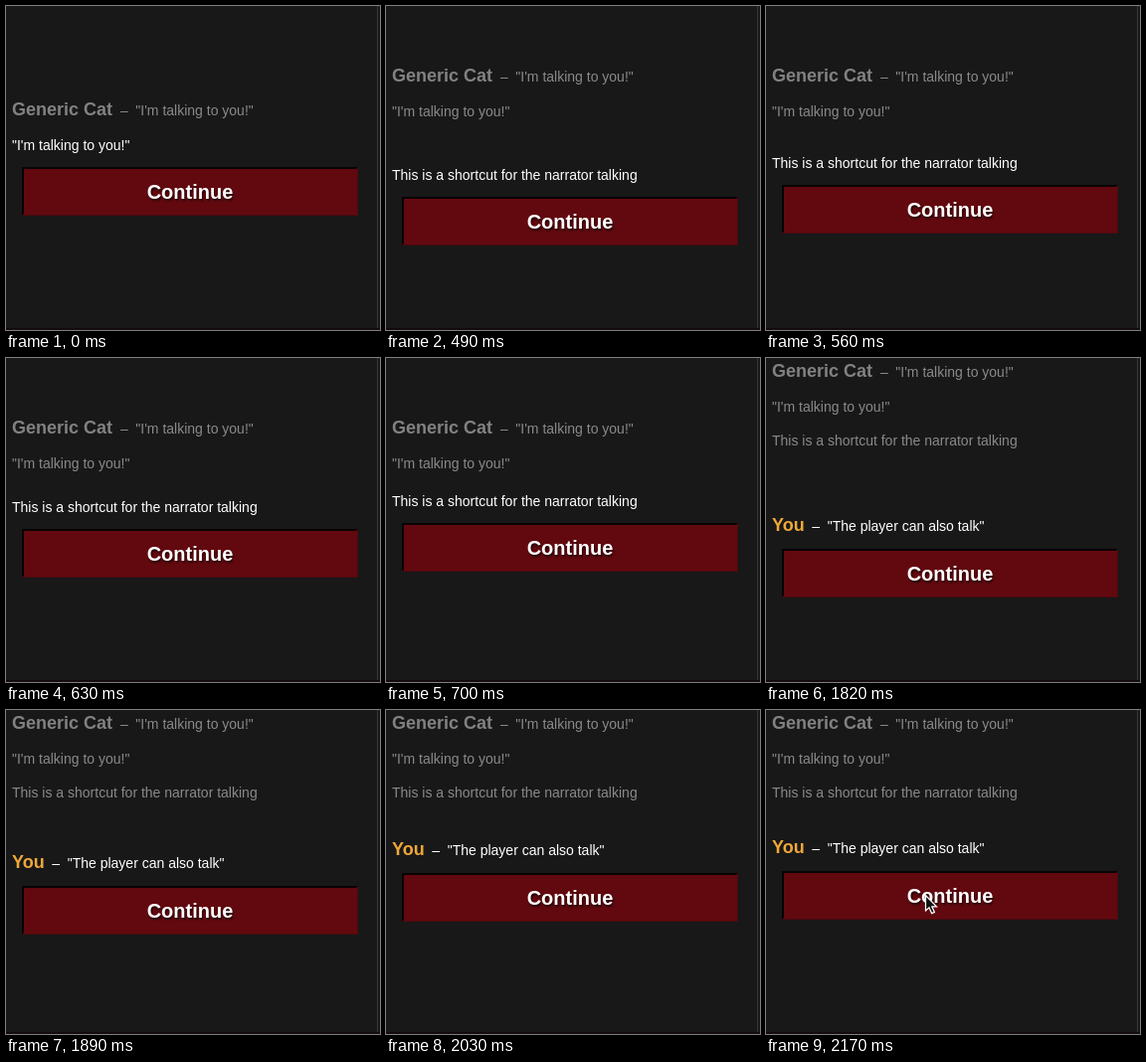
Recreate the animation shown at these times as an HTML page. Size 376 by 326 pixels, loop 2380 ms.

```html
<!DOCTYPE html>
<html lang="en">
<head>
<meta charset="utf-8">
<title>Dialogue</title>
<style>
  html, body { margin: 0; width: 100%; height: 100%; overflow: hidden; background: #181818; }
  svg { display: block; width: 376px; height: 326px; font: 14px "Liberation Sans", Arial, sans-serif; }
  .name { font-size: 18px; font-weight: bold; }
  .old { fill: #8a8a8a; }
  .old .name { fill: #828282; }
  .new { fill: #fff; }
  .new .name { fill: #efa83a; }
  .label { font-size: 20px; font-weight: bold; fill: #fff; text-anchor: middle; text-shadow: 1px 2px 2px #000a; }
</style>
</head>
<body>
<svg viewBox="0 0 376 326">
  <rect width="376" height="326" fill="#181818"/>
  <rect x="373" width="1" height="326" fill="#3a3634"/>
  <rect y="324" width="376" height="2" fill="#130b0e"/>
  <g id="cat">
    <text class="name" x="6">Generic Cat</text>
    <text x="115">–</text>
    <text x="130.3">"I'm talking to you!"</text>
  </g>
  <g id="quote"><text x="6">"I'm talking to you!"</text></g>
  <g id="narrator"><text x="6">This is a shortcut for the narrator talking</text></g>
  <g id="you">
    <text class="name" x="6">You</text>
    <text x="46.3">–</text>
    <text x="61.7">"The player can also talk"</text>
  </g>
  <g id="button">
    <rect x="16" y="162" width="338" height="49" fill="#62090f"/>
    <path d="M16 162H354L352 164H18V209L16 211Z" fill="#080304"/>
    <path d="M353.5 163V210.5H17" fill="none" stroke="#4b0a0f"/>
    <text class="label" x="185" y="194">Continue</text>
  </g>
  <path id="cursor" d="M160.5 186.5V202L164 198.8L166.6 204.6L169.4 203.4L166.8 197.8H171.5Z"
        fill="#111" stroke="#fff" stroke-width="1.2"/>
</svg>
<script>
  const LOOP = 2380, STEP = 70, SLIDE = 350, DROP = 30;
  const ids = ["cat", "quote", "narrator", "you"];
  const $ = id => document.getElementById(id);

  // Baselines of the lines visible in each scene; the last one is active.
  const scenes = [
    { start: 0, lines: [110, 145], ease: 0 },
    { start: 490, lines: [76, 111, 145], ease: 2.2 },
    { start: 1820, lines: [19, 54, 88, 144], ease: 3 }
  ];

  function slideOffset(scene, t) {
    if (!scene.ease) return 0;
    const elapsed = Math.floor((t - scene.start) / STEP) * STEP;
    const left = Math.max(0, 1 - elapsed / SLIDE);
    return Math.round(DROP * left ** scene.ease);
  }

  function move(el, y) {
    el.setAttribute("transform", `translate(0 ${y})`);
  }

  function draw(t) {
    const scene = scenes.filter(s => t >= s.start).pop();
    const offset = slideOffset(scene, t);
    const last = scene.lines.length - 1;
    ids.forEach((id, i) => {
      const el = $(id);
      el.style.display = i <= last ? "" : "none";
      if (i > last) return;
      el.setAttribute("class", i === last ? "new" : "old");
      move(el, scene.lines[i] + (i === last ? offset : 0));
    });
    move($("button"), offset);
    $("cursor").style.display = t >= 2170 ? "" : "none";
  }

  const began = performance.now();
  function tick() {
    draw((performance.now() - began) % LOOP);
    requestAnimationFrame(tick);
  }
  tick();
</script>
</body>
</html>
```
